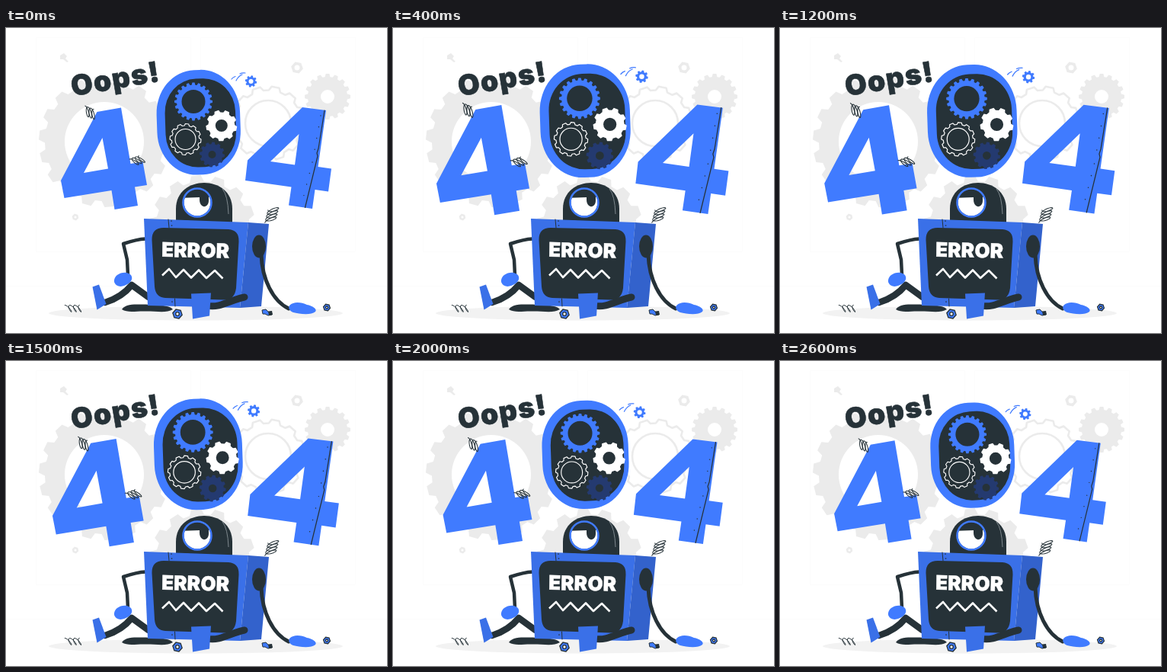
Write an HTML page that moves like this. It is 500 px wide and 400 px high and loops after 2.7 s.

```html
<!DOCTYPE html>
<html lang="en">
<head>
<meta charset="utf-8">
<title>404</title>
<style>
html, body { margin: 0; width: 100%; height: 100%; overflow: hidden; background: #fff; }
svg { display: block; width: 500px; height: 400px; }
text { font-family: Inter, "Liberation Sans", sans-serif; font-weight: 900; }
.b { fill: #407bff; }
.c { fill: #3a70e8; }
.d { fill: #263238; }
.g { fill: #ebebeb; }
.w { fill: #fff; }
.l { fill: none; stroke: #263238; stroke-linecap: round; stroke-linejoin: round; }
</style>
</head>
<body>
<svg viewBox="0 0 500 400">
  <defs>
    <clipPath id="eye"><circle cx="251" cy="229" r="17.500"/></clipPath>
  </defs>
  <g id="back">
    <path d="M39.500 12.500H242.500V293.500H39.500ZM255.500 12.500H458.500V293.500H255.500ZM0 338.500H500" fill="none" stroke="#fcfcfc"/>
  </g>
  <ellipse cx="249" cy="374" rx="193" ry="9.500" fill="#f2f2f2"/>
  <text class="d" transform="translate(87.500 89.500) rotate(-9.800)" font-size="37" letter-spacing="1.300" stroke="#263238" stroke-width=".6">Oops!</text>

  <g id="sign">
    <path class="b" fill-rule="evenodd" d="M119.500 110 151 104.500 163.500 178 179.500 175.500 185 206 169 208.500 173 233 142.500 238 138.500 213 76.500 223 72 200ZM126.500 144 102 190 134 184.500Z"/>
    <path class="b" fill-rule="evenodd" d="M389 104 420 108 409.500 182 427 184.500 423 214.500 405.500 212 402 237 371 232.500 374.500 208.500 314 200 317 173.500ZM384.500 139 347 175 379 179.500Z"/>
    <path class="l" stroke-width="1.200" d="M418 108 410 158 408 164 409 168 392.500 235.500"/>
    <path class="l" stroke-width="1.400" stroke-dasharray="0 15" d="M413 115 405 160M402 176 388 231"/>
    <g transform="rotate(-2 252 124)">
      <rect class="b" x="198" y="55" width="109.500" height="137.500" rx="51" ry="57"/>
      <rect class="d" x="209" y="66.500" width="92.500" height="116" rx="42" ry="44"/>
    </g>
    <g fill="none" stroke="#407bff" stroke-width="1.200" stroke-linecap="round">
      <path d="M296 67Q298 64.500 301 63.500M302 69Q305 63 310 61M307 60Q310 58.500 314 59"/>
    </g>
  </g>

  <g id="robot">
    <path class="d" d="M152 369C158 361 171 363 181 362.500C195 363 215 363 219 369C211 374 199 371.500 184 371.500C170 371 160 374 152 369Z"/>
    <path class="l" stroke-width="4.500" d="M183 276.500C172 277 163 280 154 283L159 304 160 324"/>
    <path class="l" stroke-width="8.500" d="M130 360C146 355 157 347 165 337L187 353"/>
    <path class="b" d="M142 333C141 325 150 320 158 321C166 322 168 330 161 335C154 340 145 341 142 333Z"/>
    <path class="c" d="M113.500 339.500 122 336.500 131.500 362 119.500 369.500Z"/>

    <path class="d" d="M223 252V237C223 191.500 297 191.500 297 237V256Z"/>
    <path d="M284 211Q291 219 292 244" fill="none" stroke="#7e888d" stroke-width="1"/>
    <g clip-path="url(#eye)">
      <path class="w" d="M230 222.800 273 221.500V250H230Z"/>
      <path class="d" d="M254 220V225C254 237 266 237 266 226V220Z"/>
    </g>
    <circle cx="251" cy="229" r="18.500" fill="none" stroke="#407bff" stroke-width="2.500"/>

    <path class="c" d="M181 250 318 255 307 367 186 364Z"/>
    <path d="M318 255 345 257 335 365 307 367Z" fill="#3362cc"/>
    <path class="d" d="M207 262 292 264Q306 265 305.500 280L302 341Q300 357 286 356.500L209 354Q196 353 195 339L191.500 278Q191 262 207 262Z"/>
    <path class="l" stroke-width="1" d="M213 251 214 262M221.500 355 222 365"/>
    <path class="l" stroke-width="1.700" d="M217 253v0M217.500 259v0M218 359v0"/>
    <text class="w" transform="translate(248.500 300.800) rotate(1.200)" font-size="26" letter-spacing=".2" text-anchor="middle" stroke="#fff" stroke-width=".5">ERROR</text>
    <path d="M205 324.500 214 316 223 327 233 317 243 327.500 253 317.500 263 328 274 318 284.500 328.500" fill="none" stroke="#fff" stroke-width="2.600" stroke-linejoin="round"/>

    <path class="l" stroke-width="9" d="M264 364C280 368 296 356 313 353"/>
    <path class="c" d="M243 348.500 269 347.500 267 377.500 245 381.500Z"/>
    <ellipse class="d" cx="332" cy="286.500" rx="9" ry="15"/>
    <path class="l" stroke-width="5" d="M335 297C336 329 350 358 371 368"/>
    <path class="b" d="M372 364C378 358 388 360 395 363C402 364 409 369 406 372C400 377 385 375 377 373C372 371 370 367 372 364Z"/>
    <path class="b" stroke="#263238" d="M336 370 341 369 345 373 348 372 349 376 344 377 340 375 337 375Z"/>
    <path class="d" d="M344 371.500 349 371 350 376 345 377Z"/>
  </g>
</svg>
<script>
const $ = id => document.getElementById(id);

function add(parent, d, attrs) {
  const p = document.createElementNS('http://www.w3.org/2000/svg', 'path');
  for (const [k, v] of Object.entries({ d, ...attrs })) p.setAttribute(k, v);
  $(parent).append(p);
}

const polar = (x, y, r, a) => (x + r * Math.cos(a)).toFixed(2) + ' ' + (y + r * Math.sin(a)).toFixed(2);
const ring = (x, y, r) => `M${x - r} ${y}a${r} ${r} 0 1 0 ${2 * r} 0a${r} ${r} 0 1 0 ${-2 * r} 0Z`;

// Toothed wheel with an optional round hole
function gear(x, y, r, teeth, depth, hole = 0, turn = 0) {
  const step = 2 * Math.PI / teeth, pts = [];
  for (let i = 0; i < teeth; i++) {
    const a = i * step + turn;
    for (const [at, cut] of [[-.34, depth], [-.2, 0], [.2, 0], [.34, depth]])
      pts.push(polar(x, y, r - cut, a + at * step));
  }
  return 'M' + pts.join('L') + 'Z' + (hole ? ring(x, y, hole) : '');
}

function hex(x, y, r, hole, turn = 0) {
  const pts = Array.from({ length: 6 }, (_, i) => polar(x, y, r, turn + i * Math.PI / 3));
  return 'M' + pts.join('L') + 'Z' + ring(x, y, hole);
}

// Slanted open coils
function spring(parent, x, y, len, angle, r, turns) {
  const pts = [], n = turns * 16;
  for (let i = 0; i <= n; i++) {
    const a = i / 16 * 2 * Math.PI, up = -r * Math.cos(a);
    pts.push((len * i / n + r * .45 * Math.sin(a) + up * .6).toFixed(2) + ' ' + up.toFixed(2));
  }
  add(parent, 'M' + pts.join('L'), {
    class: 'l', 'stroke-width': 1, transform: `translate(${x} ${y}) rotate(${angle})`
  });
}

const solid = cls => ({ class: cls, 'fill-rule': 'evenodd' });
const line = (stroke, width) => ({ fill: 'none', stroke, 'stroke-width': width, 'stroke-linejoin': 'round' });

add('back', gear(129, 149, 86, 18, 8, 52, .1), solid('g'));
add('back', gear(258, 263, 70, 14, 8, 0, .1), solid('g'));
add('back', gear(344, 125, 48.5, 12, 5, 0, .2) + ring(344, 125, 30), line('#ebebeb', 2.6));
add('back', gear(422, 90, 30, 16, 4, 9), solid('g'));
add('back', hex(382, 52, 8, 3.5, .2), solid('g'));
add('back', hex(91, 248, 4.5, 1.5, .3), solid('g'));
add('back', 'M71 36 76 33 80 37 78 40 82 44 80 45 75 41 71 41Z', solid('g'));

add('sign', gear(246, 96.5, 25, 20, 3, 15.5), solid('b'));
add('sign', gear(282.8, 128, 20.5, 9, 3, 8, .2), solid('w'));
add('sign', gear(235.5, 146, 20.5, 12, 2.4, 0, .1) + ring(235.5, 146, 13.5), line('#fff', 1.1));
add('sign', gear(270.5, 166, 16.5, 12, 2.6, 5, .1), { fill: '#243a70', 'fill-rule': 'evenodd' });
add('sign', gear(321.5, 70, 7.7, 8, 1.8, 3, .2), solid('b'));
spring('sign', 105, 109, 12, 22, 6, 3);
spring('sign', 167, 176, 13, -20, 5.5, 3);

spring('robot', 347, 253, 17, -76, 6.5, 4);
spring('robot', 80, 368, 19, 0, 4.5, 3);
add('robot', hex(225, 375, 6.3, 2.3, .2), { ...solid('b'), stroke: '#263238', 'stroke-width': 1.3 });
add('robot', hex(421, 366.5, 4.5, 1.5, .2), { ...solid('b'), stroke: '#263238', 'stroke-width': 1.3 });

const LOOP = 2700, PEAK = 700, TICK = 100, GROW = .098, CX = 259.6, CY = 148.5;

// Quick swell, then a slow steady return
function swell(t) {
  return t < PEAK ? 1 - (1 - t / PEAK) ** 2 : 1 - (t - PEAK) / (LOOP - PEAK);
}

const start = performance.now();
function draw() {
  const elapsed = Math.max(0, performance.now() - start) % LOOP;
  const s = 1 + GROW * swell(Math.floor(elapsed / TICK) * TICK);
  $('sign').setAttribute('transform', `translate(${CX} ${CY}) scale(${s}) translate(${-CX} ${-CY})`);
  requestAnimationFrame(draw);
}
draw();
</script>
</body>
</html>
```
